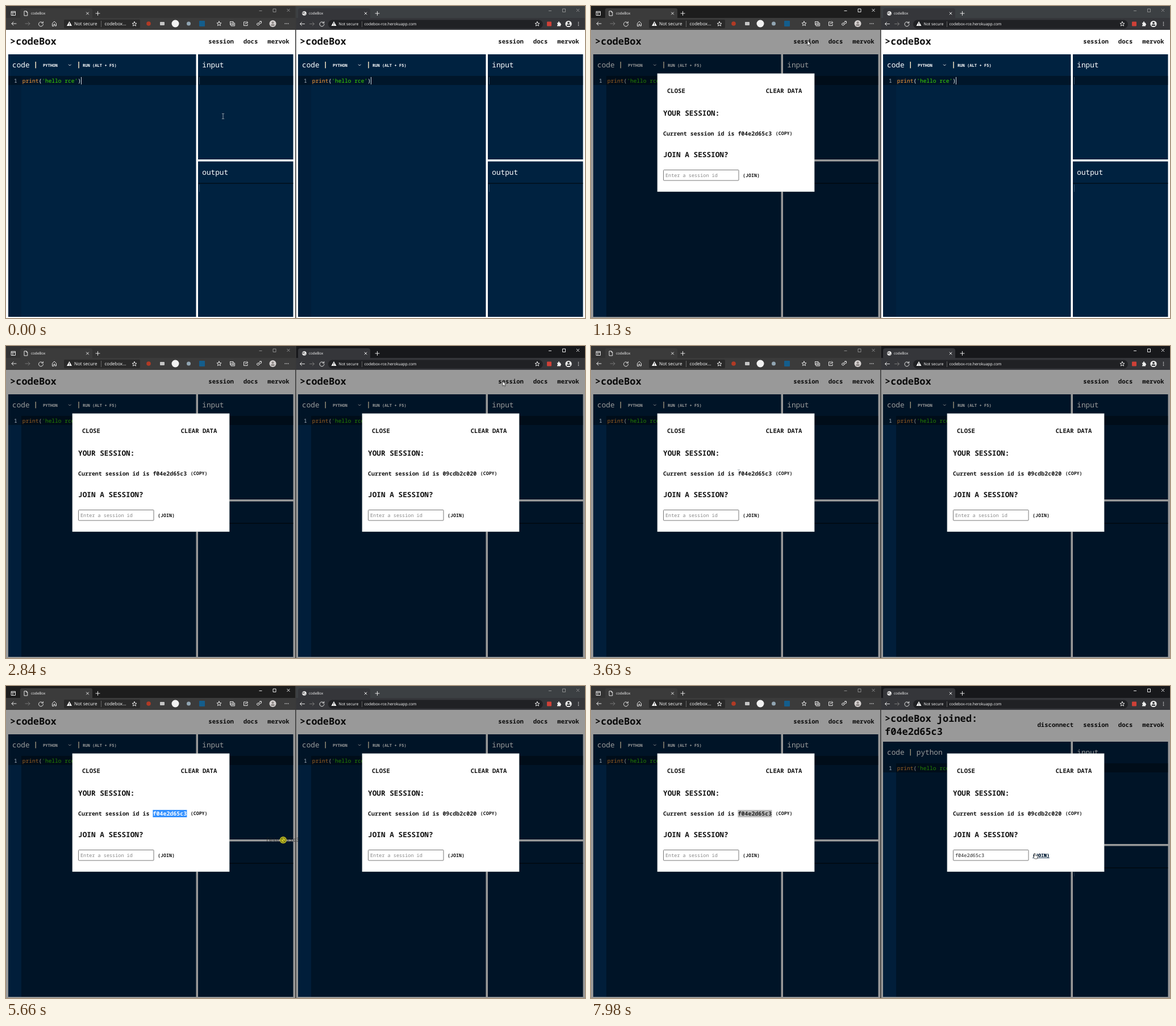
Animation of 1019x549 px, one loop 8000 ms. Source, as an HTML page:

```html
<!DOCTYPE html>
<html lang="en">
<head>
<meta charset="utf-8">
<title>codeBox</title>
<style>
  html, body { margin: 0; width: 100%; height: 100%; overflow: hidden; background: #fff; }
  svg { display: block; width: 100%; height: 100%; }
  text { white-space: pre; text-rendering: geometricPrecision; font-family: "Noto Sans Mono", "DejaVu Sans Mono", monospace; }
  .ui { font-family: "Open Sans", "Noto Sans", sans-serif; fill: #fff; }
  .line { fill: none; stroke: #e4e4e4; stroke-width: 1; stroke-linecap: round; stroke-linejoin: round; }
  .dim { stroke: #777; }
  .link { fill: #002240; text-decoration: underline; }
  .semi { font-weight: 600; }
  .bold { font-weight: 700; }
  #cursor { animation: move 8s linear infinite; }
  .sweep { animation: sweep 8s linear infinite; }
  @keyframes sweep {
    0%, 48.4% { clip-path: inset(0 100% 0 0); animation-timing-function: steps(10); }
    52%, 100% { clip-path: inset(0); }
  }
</style>
</head>
<body>
<svg id="stage" viewBox="0 0 1019 549"></svg>
<script>
const LOOP = 8000;
const JOINED = 7850;
const DROP = 6760;

// Visible intervals in ms for every switched part.
const spans = {
  leftActive: [[30, 2710], [3810, DROP]],
  rightActive: [[2710, 3810], [DROP, LOOP]],
  leftCaret: [[0, 530], [1000, LOOP]],
  leftHover: [[540, 1130]],
  rightHover: [[2420, 2840]],
  joinHover: [[7630, LOOP]],
  leftModal: [[1130, LOOP]],
  rightModal: [[2840, LOOP]],
  selected: [[3810, DROP]],
  unfocused: [[DROP, LOOP]],
  placeholder: [[0, DROP]],
  dropped: [[DROP, LOOP]],
  solo: [[0, JOINED]],
  joined: [[JOINED, LOOP]],
  beam: [[0, 430], [3500, 4200], [DROP, 7100]],
  arrow: [[430, 540], [1130, 2420], [2840, 3500], [4200, 5140], [6600, DROP], [7100, 7630]],
  hand: [[540, 1130], [2420, 2840], [7630, LOOP]],
  blocked: [[5140, 6600]],
  ghost: [[5140, DROP]]
};

// Pointer path: time, x, y.
const path = [
  [0, 382, 194], [300, 382, 194], [400, 384, 165], [540, 391, 75], [620, 395, 54],
  [750, 395, 54], [850, 381, 61], [1440, 381, 61], [1600, 440, 72], [1850, 630, 79],
  [2100, 800, 74], [2280, 863, 64], [2350, 863, 64], [2500, 874, 62], [2900, 874, 62],
  [3120, 641, 117], [3400, 370, 192], [3630, 260, 222], [3810, 260, 223], [4150, 318, 224],
  [4280, 293, 222], [4700, 293, 221], [4790, 289, 222], [5050, 289, 222], [5350, 375, 251],
  [5660, 487.5, 271], [5870, 542, 278], [6300, 598, 291], [6710, 658, 299],
  [7000, 658, 299], [7270, 771, 299], [7600, 771, 299], [7650, 781, 294], [LOOP, 781, 294]
];

const percent = ms => (ms / LOOP * 100).toFixed(3) + '%';

function toggleCss([name, list]) {
  let frames = list[0][0] ? '0%{opacity:0}' : '';
  for (const [from, to] of list) {
    frames += `${percent(from)}{opacity:1}`;
    if (to < LOOP) frames += `${percent(to)}{opacity:0}`;
  }
  const last = list[list.length - 1][1] === LOOP ? 1 : 0;
  return `.${name}{animation:${name} 8s step-end infinite}@keyframes ${name}{${frames}100%{opacity:${last}}}`;
}

const moveCss = '@keyframes move{' + path.map(([ms, x, y]) =>
  `${percent(ms)}{transform:translate(${x}px,${y}px)}`).join('') + '}';

const text = (x, y, size, str, fill = '#111', cls = '') =>
  `<text x="${x}" y="${y}" font-size="${size}" fill="${fill}" class="${cls}">${str}</text>`;
const ui = (x, y, size, str) => text(x, y, size, str, '#fff', 'ui');
const rect = (x, y, w, h, fill, rx = 0) =>
  `<rect x="${x}" y="${y}" width="${w}" height="${h}" fill="${fill}" rx="${rx}"/>`;
const dot = (x, y, r, fill) => `<circle cx="${x}" cy="${y}" r="${r}" fill="${fill}"/>`;
const icon = (x, y, d, cls = '') => `<path transform="translate(${x} ${y})" d="${d}" class="line ${cls}"/>`;
const group = (cls, body) => `<g class="${cls}">${body}</g>`;
const at = (x, body) => `<g transform="translate(${x})">${body}</g>`;

const shape = {
  back: 'M4 0H-4M-1 -3L-4 0L-1 3',
  forward: 'M-4 0H4M1 -3L4 0L1 3',
  reload: 'M3.2 -2A4 4 0 1 0 4 .5M3.8 -4V-1.5H1',
  home: 'M-3.5 4V-.5L0 -4L3.5 -.5V4H1V1H-1V4Z',
  cross: 'M-2 -2L2 2M2 -2L-2 2',
  plus: 'M-3.5 0H3.5M0 -3.5V3.5',
  star: 'M0 -4L1.1 -1.3L4 -1.1L1.8 .8L2.5 3.6L0 2L-2.5 3.6L-1.8 .8L-4 -1.1L-1.1 -1.3Z',
  page: 'M-2.6 -4H.8L2.8 -2V4H-2.6ZM.8 -4V-2H2.8',
  tabs: 'M-3.5 -3.5H3.5V3.5H-3.5ZM-3.5 -1.5H3.5M-1 -1.5V3.5',
  sheets: 'M-4 -3.5H1.5V-1M-4 -3.5V2H-2M-2 -1H4V4H-2ZM1 0V3M-.5 1.5H2.5',
  share: 'M0 -3H-3.5V3.5H3V1M-1 1Q-1 -2 3.5 -2M1.5 -4L3.7 -2L1.5 0',
  clip: 'M-4 1A2 2 0 1 0 0 1A2 2 0 1 0 -4 1M-1 -1L3 -4M0 1L4 -1V-4H1',
  puzzle: 'M-3 -2H-1V-4H1V-2H3V0H4V2H3V4H-3V2H-2V0H-3Z'
};

const warning = x =>
  `<path d="M${x} 27L${x + 4.5} 35H${x - 4.5}Z" fill="#fff"/>` + rect(x - .5, 29.5, 1, 3, '#333') + rect(x - .5, 33.2, 1, 1, '#333');
const dots = (x, y, dx, dy) => [-1, 0, 1].map(i => dot(x + i * dx, y + i * dy, .8, '#eee')).join('');

const buttons = (x, stroke) =>
  `<path d="M${x - 2.5} 8.5h5m19.5 -3.5h5v5.500h-5zm24.500 0l5 5m0 -5l-5 5" fill="none" stroke="${stroke}" stroke-width=".9"/>`;

function titleBar(x, width, idle, active, activeClass, buttonX) {
  const bar = (fill, stroke) => rect(x, 0, width, 22, fill) + buttons(buttonX, stroke);
  return bar(idle, '#969696') + group(activeClass, bar(active, '#fff'));
}

const leftChrome = () =>
  titleBar(0, 510, '#333', '#1d1d1d', 'leftActive', 448) +
  rect(25, 4, 127, 20, '#3b3b3b', 3) + rect(0, 21, 510, 21, '#3b3b3b') +
  icon(13, 13, shape.tabs) + icon(35, 13, shape.page) + ui(44, 15.2, 6.3, 'codeBox') +
  icon(143.5, 13, shape.cross) + icon(161.5, 13, shape.plus) +
  icon(14, 31, shape.back) + icon(38, 31, shape.forward, 'dim') + icon(61.5, 31.5, shape.reload) + icon(85, 31, shape.home) +
  rect(102, 24, 134, 15, '#292929', 2) + warning(111.5) + ui(120, 34.2, 8, 'Not secure') +
  rect(167, 26, .8, 11, '#777') + ui(173.500, 34.2, 8, 'codebox...') + icon(226, 31.5, shape.star) +
  dot(251, 31, 3.8, '#b23a25') + rect(271, 28, 8, 6, '#c4c4c4', 1) + dot(298, 31, 6.5, '#f2f2f2') +
  dot(321.5, 31, 3.5, '#91a5b2') + rect(340, 26, 10, 10, '#145d8c', 1) +
  icon(375, 31, shape.star) + icon(398.5, 31, shape.sheets) + icon(422, 31, shape.share) + icon(445.5, 31, shape.clip) +
  dot(469.5, 31, 6, '#d5d1d0') + dot(469.5, 29.3, 2, '#8d8785') + rect(466.3, 32, 6.4, 3, '#8d8785', 1.5) + dots(494, 31, 2.8, 0);

const rightChrome = () =>
  titleBar(510, 509, '#3c4043', '#17181b', 'rightActive', 957.5) +
  rect(514, 4, 127, 20, '#35363a', 4) + rect(510, 21, 509, 21, '#35363a') +
  dot(525, 13, 3.8, '#eee') + `<path d="M522.500 11.500h3l-1 2h-2zm3 3.500l2-1" stroke="#666" fill="none"/>` + ui(533, 15.2, 6.3, 'codeBox') +
  icon(633, 13, shape.cross) + icon(653.5, 13, shape.plus) +
  icon(521.5, 31.5, shape.back) + icon(538.5, 31.5, shape.forward, 'dim') + icon(556, 31.500, shape.reload) +
  rect(567, 24.5, 378, 15, '#202124', 7.5) + warning(577) + ui(585.5, 34.2, 6.9, 'Not secure') +
  rect(626, 27, .7, 10, '#777') + ui(630.5, 34.2, 6.9, 'codebox-rce.herokuapp.com') + icon(935, 31.5, shape.star) +
  rect(952, 27.5, 8, 8, '#cf4037', 1) + `<path transform="translate(973 31.5)" d="${shape.puzzle}" fill="#eee"/>` +
  dot(990, 31.5, 5.6, '#f1f1f1') + dot(990, 29.7, 1.9, '#35363a') + rect(986.7, 32.5, 6.6, 2.4, '#35363a', 1.2) + dots(1007.5, 31.5, 0, 2.8);

const ACTIVE_LINE = 'rgba(0,0,0,.35)';
const NAVY = '#002240';
const CREAM = '#f3e3c3';

function page(joined, caretClass = '') {
  const down = joined ? 13 : 0;   // taller header
  const half = joined ? 8 : 0;    // output pane follows by less
  const nav = (x, word) => text(x, 65.5 + down / 2, 10.62, word, '#111', 'semi');
  const code = '<tspan fill="#ff9d3a">print</tspan>(<tspan fill="#3ad900">\'hello rce\'</tspan>)';
  const title = joined
    ? text(7, 63, 17, '&gt;codeBox joined:', '#111', 'semi') + text(7, 86, 17, 'f04e2d65c3', '#111', 'semi')
    : text(7, 68, 17, '&gt;codeBox', '#111', 'semi');
  const tools = joined
    ? text(62.8, 121, 12.74, 'python', '#fff')
    : text(65, 106.7, 7.15, 'PYTHON', '#fff', 'bold') +
      `<path d="M110.300 103l2 2l2-2" class="line"/>` + rect(127.3, 98, 1.5, 11.5, CREAM) +
      text(135, 106.7, 7.12, 'RUN (ALT + F5)', '#fff', 'bold');
  return rect(0, 42, 510, 507, '#fff') + title +
    (joined ? nav(275.5, 'disconnect') : '') + nav(356.3, 'session') + nav(417.8, 'docs') + nav(460.3, 'mervok') +
    rect(4, 85 + down, 330.5, 462 - down, NAVY) +
    rect(338, 85 + down, 167.5, 185 - down + half, NAVY) +
    rect(338, 273.5 + half, 167.5, 273.5 - half, NAVY) +
    text(11, 108 + down, 12.74, 'code', '#fff') + rect(51.5, 98 + down, 1.5, 11.5, CREAM) + tools +
    text(345.3, 108 + down, 12.74, 'input', '#fff') + text(345.3, 297 + half, 12.74, 'output', '#fff') +
    rect(27, 123 + down, 307.5, 16, ACTIVE_LINE) + rect(338, 123 + down, 167.5, 16, ACTIVE_LINE) +
    rect(338, 311 + half, 167.5, 2, 'rgba(0,0,0,.45)') +
    text(28.8, 135 + down, 9.56, code, '#fff') +
    group(caretClass, rect(132, 125 + down, 1, 13, '#cfd6dd')) +
    rect(340, 125 + down, 1, 13, '#34506b') + rect(340, 314 + half, 1, 13, '#34506b');
}

const gutter = down =>
  rect(4, 123 + down, 23, 424 - down, '#011e3a') + rect(4, 123 + down, 23, 16, ACTIVE_LINE) +
  text(14, 135 + down, 9.56, '1', '#a5b2bf');

const overlay = cls => group(cls, rect(0, 42, 510, 507, 'rgba(0,0,0,.4)'));

function modal(id, field, extra) {
  const semi = (x, y, size, str) => text(x, y, size, str, '#111', 'semi');
  return '<rect x="117" y="119" width="276" height="207.500" fill="#fff" stroke="#d5ddd9" stroke-width=".8"/>' +
    semi(134, 153, 10.62, 'CLOSE') + semi(307.7, 153, 10.62, 'CLEAR DATA') +
    semi(127, 192.5, 12.74, 'YOUR SESSION:') +
    semi(127, 228, 9.96, 'Current session id is ' + id) + semi(324.8, 227.2, 8.25, '(COPY)') +
    semi(127, 265.7, 12.74, 'JOIN A SESSION?') +
    '<rect x="127.500" y="288.500" width="132.500" height="18.500" fill="#fff" stroke="#767676" rx="1"/>' +
    field + semi(267, 301, 8.3, '(JOIN)') + extra;
}

const placeholder = text(131, 301, 8.5, 'Enter a session id', '#858585');
const selection = (fill, ink) => rect(258.4, 218, 60, 13, fill) + text(258.5, 228, 9.96, 'f04e2d65c3', ink, 'semi');
const hoverSession = cls => group(cls, text(356.3, 65.5, 10.62, 'session', NAVY, 'semi link'));

const left = leftChrome() + page(false, 'leftCaret') + hoverSession('leftHover') + overlay('leftModal') + gutter(0) +
  group('leftModal', modal('f04e2d65c3', placeholder,
    group('selected', group('sweep', selection('#3390ff', '#fff'))) +
    group('unfocused', selection('#bdbdbd', '#222'))));

const rightField = group('placeholder', placeholder) + group('dropped', text(131, 301, 8.5, 'f04e2d65c3', '#222'));
const joinHover = group('joinHover', text(267, 301, 8.3, '(JOIN)', NAVY, 'semi link'));

const right = rightChrome() + at(510,
  group('solo', page(false)) + group('joined', page(true)) + hoverSession('rightHover') + overlay('rightModal') +
  group('solo', gutter(0)) + group('joined', gutter(13)) +
  group('rightModal', modal('09cdb2c020', rightField, joinHover)));

const cursor = '<g id="cursor">' +
  group('ghost', `<g opacity=".5">${text(-31, 3, 9.96, 'f04e2d65c3', '#222', 'semi')}</g>`) +
  group('beam', '<path d="M-2 -4.500H-.5L0 -4L.5 -4.500H2M0 -4V4M-2 4.500H-.5L0 4L.5 4.500H2" fill="none" stroke="#a9b0b6" stroke-width=".9"/>') +
  group('arrow', '<path d="M0 0V8.500L2 6.700L3.300 9.700L4.700 9L3.400 6.200H6Z" fill="#fff" stroke="#222" stroke-width=".7"/>') +
  group('hand', '<path d="M-1 1Q0 -.6 1 1V4L4.300 4.700Q5 5 5 6L4.300 10H-.3L-2.700 6.500Q-2.500 5 -1 6.200Z" fill="#fff" stroke="#222" stroke-width=".7"/>') +
  group('blocked', dot(0, 0, 6, '#d2cf25') + '<g fill="none" stroke="#45430f" stroke-width="1"><circle r="4"/><path d="M-2.800 -2.800L2.800 2.800"/></g>') +
  '</g>';

const style = document.createElement('style');
style.textContent = Object.entries(spans).map(toggleCss).join('') + moveCss;
document.head.append(style);
document.getElementById('stage').innerHTML = left + right + rect(509, 0, 1.6, 549, '#3a3a3a') + cursor;
</script>
</body>
</html>
```
